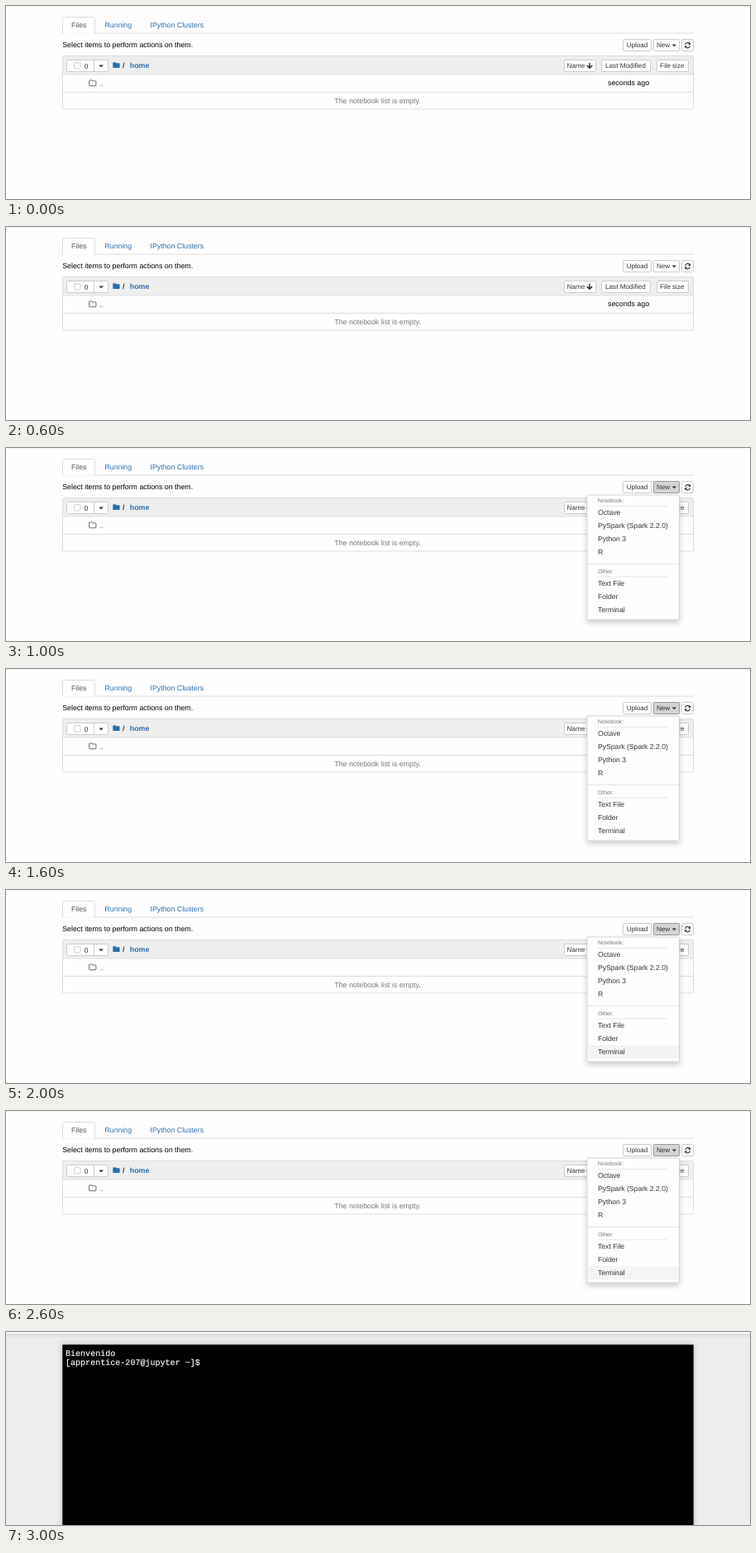
An HTML page that plays this animation: 900 by 234 pixels, repeating every 4000 ms.

```html
<!DOCTYPE html>
<html lang="en">
<head>
<meta charset="utf-8">
<title>Opening a terminal</title>
<style>
  html, body { margin: 0; width: 100%; height: 100%; overflow: hidden; background: #fefefe; }
  svg { display: block; width: 900px; height: 234px; }
  text { font: 8.8px "Liberation Sans", Arial, sans-serif; text-rendering: geometricPrecision; white-space: pre; }
  .mono { font-family: "Liberation Mono", "Courier New", monospace; }
</style>
</head>
<body>
<svg id="stage" viewBox="0 0 900 234">
  <defs>
    <linearGradient id="headShade" x1="0" y1="0" x2="0" y2="1">
      <stop offset="0" stop-color="#d9d9d9"/>
      <stop offset="1" stop-color="#ededed"/>
    </linearGradient>
    <filter id="menuShadow" x="-20%" y="-20%" width="140%" height="140%">
      <feDropShadow dx="0" dy="3.5" stdDeviation="3" flood-color="#000" flood-opacity=".2"/>
    </filter>
    <filter id="termShadow" x="-5%" y="-10%" width="110%" height="120%">
      <feDropShadow dx="0" dy="0" stdDeviation="3" flood-color="#575757" flood-opacity=".4"/>
    </filter>
  </defs>
</svg>
<script>
const NS = "http://www.w3.org/2000/svg";
const stage = document.getElementById("stage");
const LINK = "#296eaa", INK = "#333", LINE = "#ddd";

function add(parent, tag, attrs) {
  const el = document.createElementNS(NS, tag);
  for (const k in attrs) el.setAttribute(k, attrs[k]);
  return parent.appendChild(el);
}
const group = () => add(stage, "g", {});
const path = (g, d, attrs) => add(g, "path", { d, fill: "none", ...attrs });

function rect(g, x1, y1, x2, y2, attrs) {
  return add(g, "rect", { x: x1, y: y1, width: x2 - x1, height: y2 - y1, ...attrs });
}
function label(g, x, y, str, size = 8.8, fill = "#000", attrs = {}) {
  const el = add(g, "text", { x, y, fill, style: `font-size:${size}px`, ...attrs });
  el.textContent = str;
  return el;
}
function button(g, x1, y1, x2, fill = "#fff", stroke = "#ccc") {
  return rect(g, x1, y1, x2, y1 + 14, { rx: 1, fill, stroke });
}
function caret(g, x, y) {
  path(g, `M${x} ${y}h5.4l-2.7 2.8z`, { fill: INK });
}
function folder(g, x, y, attrs) {
  path(g, `M${x} ${y + 1}q0-1 1-1h2q.8 0 .8 .9h3.6q.9 0 .9 .9v4.1q0 .9-.9 .9h-6.4q-1 0-1-.9z`, attrs);
}

// File list page
const page = group();
rect(page, 0, 0, 900, 234, { fill: "#fefefe" });
path(page, "M68 33H832", { stroke: LINE });
path(page, "M68.5 33.5V15.5q0-2 2-2h35q2 0 2 2V33.5", { stroke: LINE, fill: "#fefefe" });
label(page, 79, 26.3, "Files", 8.7, "#555");
label(page, 119.5, 26.3, "Running", 8.75, LINK);
label(page, 174.5, 26.3, "IPython Clusters", 8.8, LINK);
label(page, 68.2, 49.7, "Select items to perform actions on them.", 8.83);

button(page, 746.5, 40.5, 780.5);
label(page, 750.7, 50.4, "Upload", 8.1, INK);
const newBox = g => [rect(g, 783.5, 40.5, 814.5, 54.5, { rx: 1 }), label(g, 787, 50.4, "New", 8.1, INK), caret(g, 805.6, 46.5)][0];
const idle = newBox(page);
idle.setAttribute("fill", "#fff");
idle.setAttribute("stroke", "#ccc");
button(page, 817.5, 40.5, 831.5);
path(page, "M821.7 46.8A3 3 0 0 1 827 45.6M827.5 48.4A3 3 0 0 1 822.2 49.6", { stroke: INK, "stroke-width": 1.2 });
path(page, "M828.1 44v3h-3zM821.1 51.2v-3h3z", { fill: INK });

rect(page, 68.5, 60.5, 831.5, 125, { rx: 1, fill: "#fefefe", stroke: LINE });
rect(page, 69, 61, 831, 82.5, { fill: "#eee" });
path(page, "M69 83H831M69 104.5H831", { stroke: LINE });
button(page, 73.5, 65.5, 123.5);
path(page, "M106.5 65.5v14", { stroke: "#ccc" });
rect(page, 82.5, 68.7, 90, 76, { rx: 1.5, fill: "#fff", stroke: "#bbb", "stroke-width": .7 });
label(page, 94.8, 75.5, "0", 8.4, INK);
caret(page, 112.4, 71.6);
folder(page, 129.3, 68.3, { fill: LINK });
label(page, 141, 74.6, "/", 8.8, INK, { "font-weight": "bold" }).style.fontWeight = "bold";
label(page, 149.8, 74.6, "home", 8.83, LINK).style.fontWeight = "bold";

button(page, 675.5, 65.5, 713.5);
label(page, 678.6, 75.3, "Name", 8.1, INK);
path(page, "M705.9 69v6M702.7 72.1l3.2 3.2l3.2-3.2", { stroke: INK, "stroke-width": 1.5 });
button(page, 720.5, 65.5, 779.5);
label(page, 725, 75.3, "Last Modified", 8.2, INK);
button(page, 787.5, 65.5, 825.5);
label(page, 791, 75.3, "File size", 8, INK);

folder(page, 100.6, 90, { stroke: "#444", "stroke-width": .8 });
label(page, 113, 96.5, "..", 8.8, LINK);
label(page, 728, 96.3, "seconds ago", 8.83);
label(page, 397.3, 117.6, "The notebook list is empty.", 8.83, "#777");

// Open menu
const menu = group();
const pressed = newBox(menu);
pressed.setAttribute("fill", "#d4d4d4");
pressed.setAttribute("stroke", "#999");
rect(menu, 703, 57, 814.5, 208, { rx: 1, fill: "#fefefe", stroke: "#ccc", "stroke-width": .8, filter: "url(#menuShadow)" });
const hover = rect(menu, 703.5, 188.2, 814, 204.4, { fill: "#f4f4f4" });
path(menu, "M716 70.5h84M703.5 140.5h110.5M716 156h84", { stroke: "#e5e5e5" });
label(menu, 716, 65.8, "Notebook:", 6.85, "#777");
label(menu, 716, 151.6, "Other:", 6.85, "#777");
const column = (y, items) => items.forEach((s, i) => label(menu, 716, y + i * 16.1, s, 8.65, INK));
column(81.1, ["Octave", "PySpark (Spark 2.2.0)", "Python 3", "R"]);
column(167, ["Text File", "Folder", "Terminal"]);

// Terminal page
const term = group();
rect(term, 0, 0, 900, 234, { fill: "#ededed" });
rect(term, 0, 2, 900, 8, { fill: "url(#headShade)" });
rect(term, 68.3, 15.3, 831.7, 250, { filter: "url(#termShadow)" });
["Bienvenido", "[apprentice-207@jupyter ~]$"].forEach((s, i) =>
  label(term, 72, 29 + i * 11.4, s, 10.05, "#fff", { class: "mono", stroke: "#fff", "stroke-width": .15 }));

// Header edge, shared by every page
const edge = group();
rect(edge, 0, 0, 900, 2, { fill: "#fefefe" });
rect(edge, 0, 0, 900, 1, { fill: "#f5f5f5" });

// Visible spans in ms
const LOOP = 4000;
const spans = [[menu, 1000, 3000], [hover, 2000, 3000], [term, 3000, LOOP]];
for (const [el, from, to] of spans) {
  const steps = [[0, 0], [from, 1], [to, 0]];
  el.animate(
    steps.map(([t, opacity]) => ({ offset: t / LOOP, opacity, easing: "step-end" }))
      .concat(to < LOOP ? [{ offset: 1, opacity: 0 }] : []),
    { duration: LOOP, iterations: Infinity }
  );
}
</script>
</body>
</html>
```
